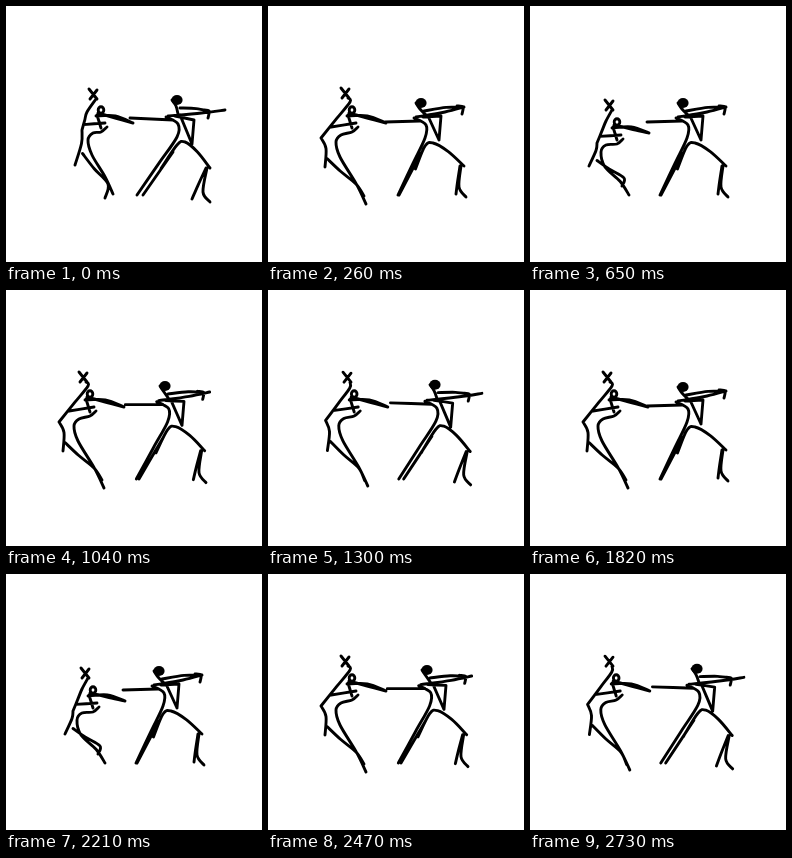
Write an HTML page that moves like this. It is 256 px wide and 256 px high and loops after 2.86 s.

```html
<!DOCTYPE html>
<html lang="en">
<head>
<meta charset="utf-8">
<title>Fencers</title>
<style>
  html, body { margin: 0; width: 100%; height: 100%; overflow: hidden; background: #fff; }
  svg { display: block; width: 100vw; height: 100vh; }
  path { fill: none; stroke: #000; stroke-width: 2.9; stroke-linecap: round; stroke-linejoin: round; }
  #hat { fill: #000; stroke: none; }
</style>
</head>
<body>
<svg viewBox="0 0 256 256"><path id="lines"/><path id="hat"/></svg>
<script>
const STEP = 130, CYCLE = 11;

// Joints of the left fencer: upright, leaning back, crouching.
const LEFT = {
  palm:  [[87, 88], [77, 87], [79, 99]],
  elbow: [[81, 106], [82, 96], [76, 115]],
  hip:   [[76, 124], [53, 132], [67, 137]],
  head:  [[95, 104], [84, 104], [87, 116]],
  tip:   [[127, 117], [118, 117], [119, 127]],
  cape:  [[69, 159], [57, 161], [59, 160]],
  waist: [[82, 134], [68, 136], [71, 146]],
  toe:   [[107, 188], [98, 198], [99, 189]],
  shin:  [[102, 178], [88, 178], [94, 172]],
  heel:  [[99, 192], [96, 190], [92, 180]]
};

// Joints of the right fencer: lunging forward, pulled back.
const RIGHT = {
  hat:      [[153, 97], [171, 94]],
  tip:      [[117, 116], [124, 112]],
  hilt:     [[152, 115], [167, 114]],
  shoulder: [[158, 119], [172, 118]],
  waist:    [[171, 134], [186, 138]],
  wrist:    [[195, 101], [203, 105]],
  hand:     [[196, 101], [219, 104]],
  hip:      [[165, 137], [179, 136]],
  foot:     [[130, 189], [131, 189]],
  knee:     [[196, 160], [204, 162]],
  heel:     [[188, 188], [186, 193]],
  toe:      [[198, 191], [204, 196]]
};

const add = ([x, y], dx, dy) => [x + dx, y + dy];
const lerp = (p, q, k) => p.map((v, i) => v + (q[i] - v) * k);
const clamp = v => Math.max(0, Math.min(1, v));

function blend(joints, weights) {
  const sum = (poses, axis) => weights.reduce((t, w, i) => t + w * poses[i][axis], 0);
  return Object.fromEntries(Object.entries(joints).map(([name, poses]) =>
    [name, [sum(poses, 0), sum(poses, 1)]]));
}

function leftStrokes(j) {
  const bust = add(j.head, 6, 17);
  const fold = add(lerp(j.hip, j.cape, .5), 3, -4);
  const thigh = add(fold, 1, 10);
  return [
    [add(j.palm, -4, -5), add(j.palm, 4, 5)],
    [add(j.palm, 4, -4), add(j.palm, -3, 5)],
    [add(j.palm, 3, 5), j.elbow, lerp(j.elbow, j.hip, .45), j.hip],
    [add(j.head, -5, 6), lerp(j.head, j.tip, .45), j.tip],
    [add(j.head, -3, 3), add(lerp(j.head, j.tip, .5), 0, 2), j.tip],
    [lerp(j.hip, j.elbow, .3), add(j.head, 4, 13)],
    [add(j.head, -4, 5), add(j.head, 0, 18)],
    [j.hip, fold, j.cape],
    [bust, add(bust, -6, 5), add(j.waist, 5, -7), j.waist,
      add(j.waist, 4, 15), lerp(j.waist, j.toe, .68), j.toe],
    [thigh, add(lerp(thigh, j.shin, .5), -1, 0), j.shin, j.heel]
  ];
}

function rightStrokes(j, pull) {
  const flank = add(j.shoulder, -1, 13);
  return [
    [j.tip, j.hilt],
    [add(j.shoulder, -12, -7), j.shoulder, flank, lerp(flank, j.foot, .45), j.foot],
    [add(j.shoulder, -5, 28), add(j.foot, 1 + 5 * pull, 0)],
    [add(j.hat, -5, 0), add(j.hat, -1, 6), add(j.shoulder, 0, -10)],
    [add(j.shoulder, -10, -8), add(lerp(j.shoulder, j.hand, .5), 0, -4), j.hand],
    [add(j.hat, 3, 8), add(lerp(j.hat, j.wrist, .6), 0, 2), j.wrist],
    [add(j.wrist, -6, -1), j.wrist, add(j.wrist, -1, 7)],
    [add(j.shoulder, 2, -9), j.waist],
    [j.waist, add(j.waist, 2, -24)],
    [add(j.waist, 2, -24), add(j.shoulder, -3, -8)],
    [lerp(j.foot, j.hip, .5), add(j.hip, -8, 3), j.hip,
      add(lerp(j.hip, j.knee, .45), 1, -2), j.knee],
    [add(j.knee, -4, 0), add(lerp(j.knee, j.heel, .55), -2, 0), j.heel],
    [add(j.knee, -3, 0), add(j.toe, -7, -10), j.toe]
  ];
}

const xy = p => p.map(v => v.toFixed(2)).join(' ');

function smooth(pts) {
  let d = 'M' + xy(pts[0]);
  for (let i = 0; i < pts.length - 1; i++) {
    const p = pts[i], q = pts[i + 1], before = pts[i - 1] || p, after = pts[i + 2] || q;
    const out = p.map((v, n) => v + (q[n] - before[n]) / 6);
    const into = q.map((v, n) => v - (after[n] - p[n]) / 6);
    d += `C${xy(out)} ${xy(into)} ${xy(q)}`;
  }
  return d;
}

function oval([x, y], rx, ry) {
  const arc = `a${rx} ${ry} 0 1 1 `;
  return `M${xy([x - rx, y])}${arc}${2 * rx} 0${arc}${-2 * rx} 0Z`;
}

const lines = document.getElementById('lines'), hat = document.getElementById('hat');

function draw(u) {
  const crouch = clamp(1.25 - Math.abs(u - 5.5) / 2);
  const upright = Math.max(0, 1 - u * u / 4, 1 - (CYCLE - u) * .8);
  const pull = Math.max(0, 1 - u / 2, (u - 6.5) / 4.5);
  const left = blend(LEFT, [upright, 1 - upright - crouch, crouch]);
  const right = blend(RIGHT, [1 - pull, pull]);
  const strokes = [...leftStrokes(left), ...rightStrokes(right, pull)];
  lines.setAttribute('d', strokes.map(smooth).join('') + oval(left.head, 2.8, 3.2));
  hat.setAttribute('d', oval(right.hat, 5.6, 5));
}

let shown = -1;
function tick() {
  const u = Math.floor(performance.now() / STEP) % CYCLE;
  if (u !== shown) draw(shown = u);
  requestAnimationFrame(tick);
}
tick();
</script>
</body>
</html>
```
